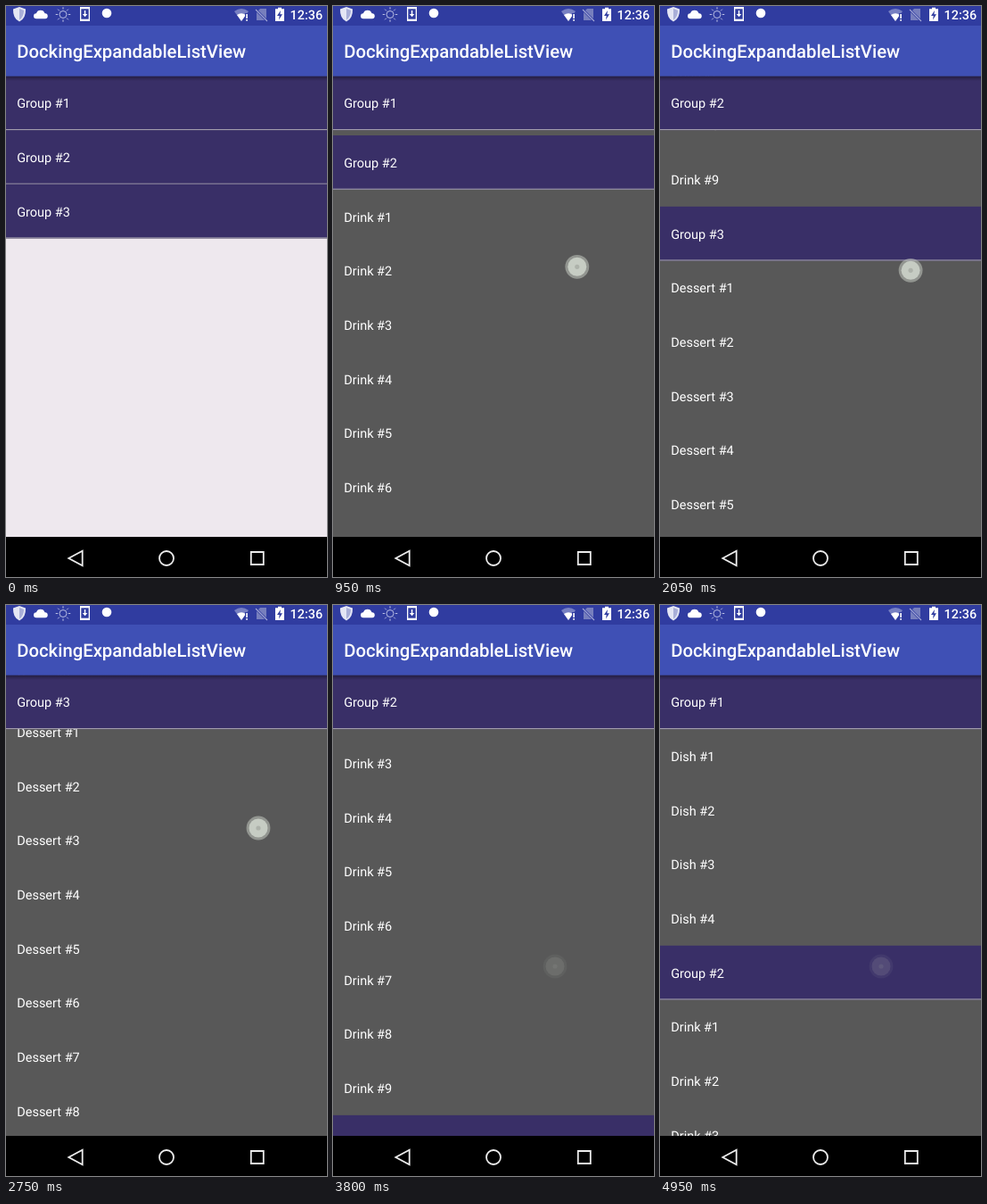
These frames come from a looping animation (360 px wide and 640 px high, 5 s). An HTML page with a canvas:

```html
<!DOCTYPE html>
<html lang="en">
<head>
<meta charset="utf-8">
<title>Docking list</title>
<style>
html, body { margin: 0; width: 100%; height: 100%; overflow: hidden; background: #000; }
canvas { display: block; width: 360px; height: 640px; }
</style>
</head>
<body>
<canvas id="stage" width="360" height="640"></canvas>
<script>
const ctx = document.getElementById('stage').getContext('2d');
const LOOP = 5000, STEP = 50, ROW = 60.67, TOP = 78.4, BOTTOM = 595;
const STATUS = '#303ca0', FADE = 115, LEAN = 0.19;

const groups = [
  { item: 'Dish', count: 4 },
  { item: 'Drink', count: 9 },
  { item: 'Dessert', count: 8 }
];
// Groups open from the last one up, each by a short tap.
const opensAt = g => 300 - 100 * g;

// Each drag moves the list with the finger, which lifts at (x, y).
const drags = [
  { press: 400, lift: 1100, from: 1, to: 301, x: 286, y: 228 },
  { press: 1200, lift: 1450, from: 305, to: 432, x: 289, y: 270 },
  { press: 1800, lift: 2100, from: 582, to: 800, x: 288, y: 260 },
  { press: 2200, lift: 2750, from: 851, to: 937, x: 283, y: 250 },
  { press: 2850, lift: 3200, from: 937, to: 775, x: 246, y: 405 },
  { press: 3400, lift: 3700, from: 666, to: 492, x: 249, y: 405 },
  { press: 4050, lift: 4200, from: 338, to: 192, x: 238, y: 401 },
  { press: 4550, lift: 4850, from: 103, to: 0, x: 248, y: 405 }
];

const mix = (a, b, k) => a + (b - a) * k;
const easeOut = k => 1 - (1 - k) ** 2;

function dragScroll(drag, t) {
  const k = Math.min(1, (t - drag.press) / (drag.lift - drag.press));
  return mix(drag.from, drag.to, k);
}

// Follows the finger while pressed, then coasts to where the next drag begins.
function scrollAt(t) {
  const i = drags.findLastIndex(drag => t >= drag.press);
  if (i < 0) return 0;
  const drag = drags[i], next = drags[i + 1];
  if (t <= drag.lift || !next) return dragScroll(drag, t);
  return mix(drag.to, next.from, easeOut((t - drag.lift) / (next.press - drag.lift)));
}

function rect(x, y, w, h, color) {
  ctx.fillStyle = color;
  ctx.fillRect(x, y, w, h);
}

function disc(x, y, r, color) {
  ctx.fillStyle = color;
  ctx.beginPath();
  ctx.arc(x, y, r, 0, Math.PI * 2);
  ctx.fill();
}

function fillPath(d, color) {
  ctx.fillStyle = color;
  ctx.fill(new Path2D(d));
}

function strokePath(d, color, width) {
  ctx.strokeStyle = color;
  ctx.lineWidth = width;
  ctx.stroke(new Path2D(d));
}

function text(label, x, y, size, weight = 400) {
  ctx.font = `${weight} ${size}px Roboto, sans-serif`;
  ctx.textRendering = 'geometricPrecision';
  ctx.fillStyle = '#fff';
  ctx.fillText(label, x, y);
}

function drawRow(row, y) {
  if (row.header) {
    rect(0, y, 360, ROW, '#392f67');
    rect(0, y + ROW - 1, 360, 1, '#aaa6b2');
  }
  text(row.label, 12.2, Math.round(y + 35.9), 14.5);
}

function buildRows(t) {
  return groups.flatMap(({ item, count }, g) => {
    const shown = t < opensAt(g) ? 0 : count;
    const children = Array.from({ length: shown }, (_, i) => ({ label: `${item} #${i + 1}` }));
    return [{ label: `Group #${g + 1}`, header: true }, ...children];
  });
}

function drawList(t) {
  const rows = buildRows(t), scroll = scrollAt(t);
  ctx.save();
  ctx.beginPath();
  ctx.rect(0, 78, 360, BOTTOM - 78);
  ctx.clip();
  rect(0, 78, 360, BOTTOM - 78, '#eee8ee');
  rect(0, TOP - scroll, 360, rows.length * ROW, '#585858');
  let docked = rows[0], push = 0;
  rows.forEach((row, i) => {
    const y = i * ROW - scroll;
    if (y > -ROW && y < BOTTOM) drawRow(row, TOP + y);
    if (!row.header) return;
    if (y <= 0) docked = row;
    else if (y < ROW) push = ROW - y;
  });
  rect(0, TOP - push, 360, ROW, '#392f67');
  drawRow(docked, TOP - push);
  const shade = ctx.createLinearGradient(0, 78, 0, 84);
  shade.addColorStop(0, 'rgba(0,0,0,.42)');
  shade.addColorStop(1, 'rgba(0,0,0,0)');
  rect(0, 78, 360, 6, shade);
  ctx.restore();
}

function drawSun(x, y) {
  ctx.strokeStyle = '#b9bee4';
  ctx.lineWidth = 1;
  ctx.beginPath();
  ctx.arc(x, y, 4, 0, Math.PI * 2);
  for (let i = 0; i < 8; i++) {
    const c = Math.cos(i * Math.PI / 4), s = Math.sin(i * Math.PI / 4);
    ctx.moveTo(x + c * 5.8, y + s * 5.8);
    ctx.lineTo(x + c * 8.3, y + s * 8.3);
  }
  ctx.stroke();
}

function drawStatusBar() {
  rect(0, 0, 360, 22, STATUS);

  fillPath('M15 1L22 3.5Q22.5 14 15 17.5Q7.5 14 8 3.5Z', '#e4e6f4');
  fillPath('M15 3L20 5Q20 12.5 15 15.5Z', '#a9afd8');
  fillPath('M34 14.3a3 3 0 0 1 0-6a5 5 0 0 1 9.5 0a3 3 0 0 1 .5 6Z', '#fff');
  drawSun(64, 9.5);

  rect(83, 1, 11, 16, '#fff');
  rect(84.3, 3.3, 8.4, 11.4, STATUS);
  fillPath('M87.8 5h1.5v4h2l-2.7 3.3l-2.8-3.3h2Z', '#fff');
  disc(113, 8, 5.3, '#fff');

  fillPath('M264 17L256 6Q264 0 272 6Z', '#7780c2');
  fillPath('M264 17L259 10Q264 6.5 269 10Z', '#fff');
  rect(268, 8, 4, 9, STATUS);
  fillPath('M269.3 9h1.6v5h-1.6ZM269.3 15h1.6v1.7h-1.6Z', '#fff');

  fillPath('M285 3h7v13h-11v-9Z', '#777fbd');
  strokePath('M280 4l13 13', STATUS, 2.6);
  strokePath('M280 4l13 13', '#a5aad6', 1.1);

  fillPath('M302 3.2h3V1.8h4v1.4h3V17h-10Z', '#fff');
  fillPath('M308 5l-4 6h2.7l-.7 4.5l4-6.2h-2.6Z', STATUS);
  text('12:36', 318.6, 15, 14.4, 500);
}

function drawNavBar() {
  rect(0, BOTTOM, 360, 45, '#000');
  strokePath('M70.3 619l15.4-8.3v16.6Z', '#ececec', 1.8);
  strokePath('M172 619a8 8 0 0 1 16 0a8 8 0 0 1-16 0Z', '#ececec', 1.8);
  strokePath('M274.8 612h14v14h-14Z', '#ececec', 1.8);
}

function drawTouch(t, press, lift, x, y) {
  const alpha = Math.min(1, 1 - (t - lift) / FADE);
  if (t < press || alpha <= 0) return;
  ctx.globalAlpha = alpha;
  disc(x, y, 13.4, 'rgba(200,205,196,.52)');
  disc(x, y, 10.5, '#c6ccc3');
  disc(x, y, 2.6, '#adb2aa');
  ctx.globalAlpha = 1;
}

function drawTouches(t) {
  groups.forEach((_, g) => {
    drawTouch(t, opensAt(g) - STEP, opensAt(g), 236, 109 + g * ROW);
  });
  for (const drag of drags) {
    const left = dragScroll(drag, t) - drag.to;
    drawTouch(t, drag.press, drag.lift, drag.x + left * LEAN, drag.y - left);
  }
}

function draw(t) {
  drawList(t);
  drawStatusBar();
  rect(0, 22, 360, 56.7, '#3f50b5');
  text('DockingExpandableListView', 12.2, 58, 20.3, 500);
  drawNavBar();
  drawTouches(t);
}

const start = performance.now();
function tick() {
  const elapsed = (performance.now() - start) % LOOP;
  draw(Math.floor(elapsed / STEP) * STEP);
  requestAnimationFrame(tick);
}
tick();
</script>
</body>
</html>
```
